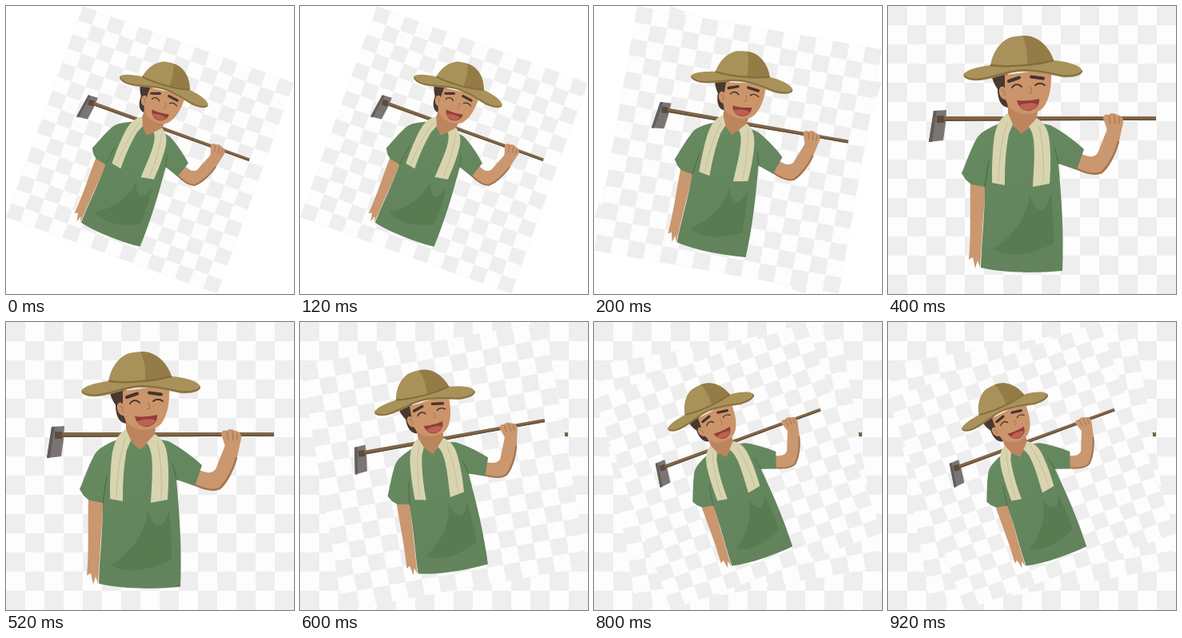
These frames come from a looping animation (360x360 px, 1 s). An HTML page:

```html
<!DOCTYPE html>
<html lang="en">
<head>
<meta charset="utf-8">
<title>Swaying farmer</title>
<style>
  html, body { margin: 0; width: 100%; height: 100%; overflow: hidden; background: #fff; }
  svg { display: block; width: 100vw; height: 100vh; }
  .line { fill: none; stroke-linecap: round; stroke-linejoin: round; }
</style>
</head>
<body>
<svg id="stage" viewBox="0 0 360 360">
  <defs>
    <pattern id="checks" width="48" height="48" patternUnits="userSpaceOnUse">
      <path d="M0 0h24v24h-24zM24 24h24v24h-24z" fill="#eeeeee"/>
    </pattern>
    <linearGradient id="cloth" x2="0.3" y2="1">
      <stop stop-color="#678a61"/>
      <stop offset="1" stop-color="#62835b"/>
    </linearGradient>

    <g id="card">
      <path d="M0 0h360v360H0z" fill="#fdfdfd"/>
      <path d="M0 0h360v360H0z" fill="url(#checks)"/>

      <!-- hoe -->
      <path d="M57 131L73 130L72 147L69 168L51 170Z" fill="#7a7573"/>
      <path d="M57 131L61 131L55 170L51 170Z" fill="#625d5b"/>
      <path d="M62 138L335 138V142.5L62 144Z" fill="#806649"/>
      <path d="M66 143L335 142" stroke="#5f4a35" stroke-width="1.4"/>
      <path d="M61 137h9v9h-9z" fill="#5d4a3d"/>

      <!-- arms -->
      <path d="M103 218L122 222C120 255 117 290 115 327L112 318L109 328L106 314L101 317C104 285 102 250 103 218Z" fill="#ca976f"/>
      <path d="M240 184C250 189 257 190 262 184L274 154L292 153C289 175 280 200 268 209C256 213 245 208 234 204Z" fill="#ca976f"/>
      <path class="line" d="M237 204C248 209 259 212 267 208C276 199 284 184 288 170" stroke="#a0744f" stroke-width="2.4"/>

      <!-- neck and shirt -->
      <path d="M150 118L188 122L185 150L167 162L150 148Z" fill="#bd855e"/>
      <path d="M144 145C125 152 114 159 110 167C102 182 97 198 92 209L97 217L104 223L121 226C121 260 117 295 116 327C145 334 187 334 218 331C220 285 217 240 213 197L236 205L245 179C231 166 215 155 203 149L184 145L167 160L154 147Z" fill="url(#cloth)"/>
      <path d="M177 236C172 272 151 291 131 304C154 317 182 309 207 297C207 275 206 253 204 235C198 256 188 266 177 236Z" fill="#54784f" opacity="0.7"/>
      <path class="line" d="M121 226C123 215 124 204 126 194M213 197C212 190 210 184 208 178" stroke="#4e6e49" stroke-width="1.3"/>

      <!-- towel -->
      <path d="M150 134C139 140 134 152 132 170C130 190 130 205 130 221L146 224C146 200 147 180 151 160L156 148Z" fill="#d8d4b0"/>
      <path d="M186 140C196 146 201 156 202 170C204 190 203 208 202 222L181 226C182 205 184 185 182 168C181 160 179 155 176 151Z" fill="#d8d4b0"/>
      <path class="line" d="M149 146C142 166 139 190 138 219M189 150C194 172 195 198 194 221" stroke="#c4c09a" stroke-width="1.2"/>

      <!-- head -->
      <path d="M129 84L150 82L148 104L150 127C142 126 137 118 137 104C133 98 130 92 129 84Z" fill="#49392f"/>
      <path d="M146 86L204 79C205 100 202 117 194 127C185 137 167 137 156 130C150 125 148 120 147 117C141 117 138 109 139 104C141 99 145 100 146 103Z" fill="#cb946b"/>
      <path class="line" d="M142 105C145 105 146 108 146 112M178 101C180 105 181 108 177 109" stroke="#aa7450" stroke-width="1.2"/>
      <path class="line" d="M151 94L164 89.500M179 88.500L194 90.500" stroke="#44352c" stroke-width="4"/>
      <path class="line" d="M155 102C158 97 164 97 167 101M184 99C187 96 192 96 196 99" stroke="#44352c" stroke-width="1.8"/>
      <path d="M161 118C170 119 181 118 189 116C190 124 184 130 176 131C168 131 163 126 161 118Z" fill="#8f3f36"/>
      <path d="M164 124C171 121 181 120 187 123C184 128 180 130 175 130C170 130 166 128 164 124Z" fill="#bf6152"/>

      <!-- hat -->
      <path d="M94 86C97 80 112 76 128 74C131 58 139 46 151 40C163 36 178 36 187 42C198 49 204 58 207 68C223 69 241 74 243 81C243 87 232 90 218 89C200 85 185 82 168 82C150 83 138 89 122 92C106 95 95 92 94 86Z" fill="#a9915a"/>
      <path d="M168 37C187 36 201 50 207 68C197 72 186 74 174 75C175 60 173 47 168 37Z" fill="#957c47"/>
      <path class="line" d="M129 74C152 77 184 74 206 68" stroke="#846d3d" stroke-width="2.500"/>
      <path class="line" d="M96 88C102 93 114 92 122 90C138 87 150 81 168 80C188 80 202 84 218 87C230 88 240 86 242 82" stroke="#866f40" stroke-width="2"/>

      <!-- hand -->
      <path d="M270 143C267 137 272 134 276 136C279 133 284 134 286 136C291 136 295 140 294 146C293 151 292 154 291 158L274 158C274 152 271 148 270 143Z" fill="#ca976f"/>
      <path class="line" d="M276 137L278 147M283 137L284 147M289 139L289 147" stroke="#a5734f" stroke-width="1.2"/>
    </g>
  </defs>
</svg>
<script>
const stage = document.getElementById("stage");
const STEP = 200;

// Each card is turned, then shrunk so its corners still fit the stage.
const cards = [20, 10, 0, -10, -20].map(deg => {
  const a = Math.abs(deg) * Math.PI / 180;
  const scale = 1 / (Math.cos(a) + Math.sin(a));
  const card = document.createElementNS(stage.namespaceURI, "use");
  card.setAttribute("href", "#card");
  card.setAttribute("transform",
    `translate(180 180) rotate(${deg}) scale(${scale}) translate(-180 -180)`);
  return stage.appendChild(card);
});

// Earlier cards stay underneath until the loop restarts.
function show(ms) {
  const top = Math.floor(ms / STEP) % cards.length;
  cards.forEach((card, i) => card.style.display = i <= top ? "" : "none");
}

const start = performance.now();
function tick() {
  show(performance.now() - start);
  requestAnimationFrame(tick);
}
tick();
</script>
</body>
</html>
```
